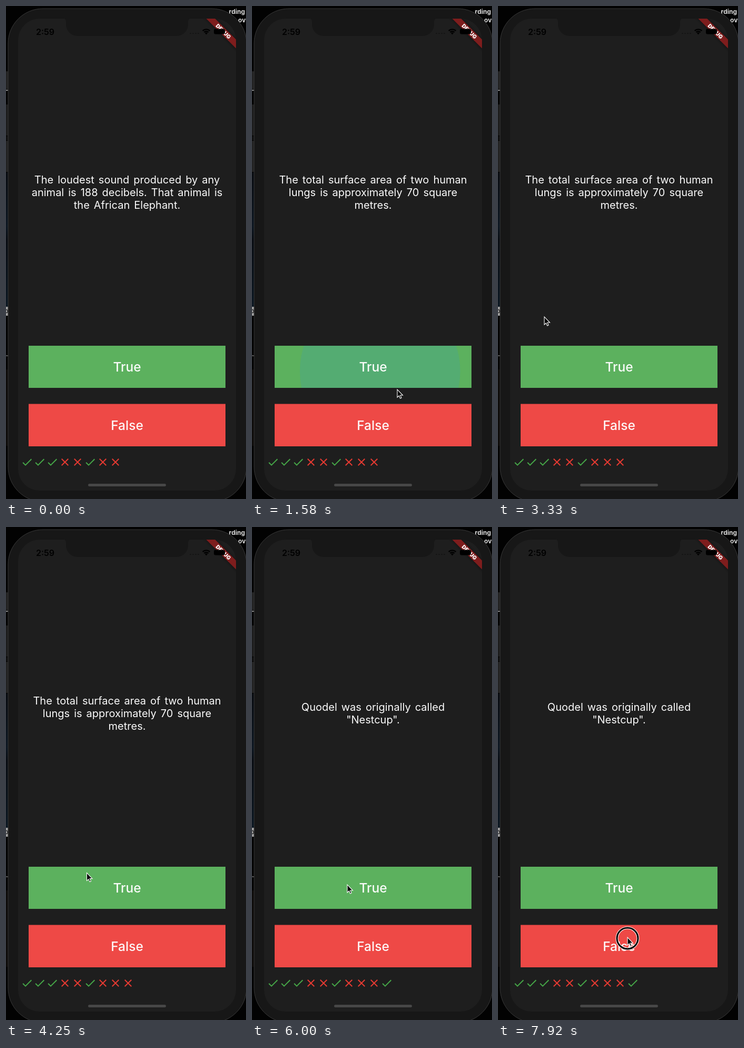
Recreate the animation shown at these times as an HTML page with a canvas. Size 456x936 px, loop 8 s.

```html
<!DOCTYPE html>
<html lang="en">
<head>
<meta charset="utf-8">
<title>Quiz</title>
<style>
  html, body { margin: 0; width: 100%; height: 100%; overflow: hidden; background: #000; }
  canvas { display: block; width: 456px; height: 936px; }
</style>
</head>
<body>
<canvas id="stage" width="456" height="936"></canvas>
<script>
const ctx = document.getElementById('stage').getContext('2d');
const LOOP = 8000, STEP = 1000 / 12;
const BEZEL = '#171717', SCREEN = '#1e1e1e';

const QUESTIONS = [
  { at: 0, lines: ['The loudest sound produced by any', 'animal is 188 decibels. That animal is', 'the African Elephant.'] },
  { at: 1490, lines: ['The total surface area of two human', 'lungs is approximately 70 square', 'metres.'] },
  { at: 4740, lines: ['Quodel was originally called', '"Nestcup".'] }
];
const ANSWERS = 'vvvxxvxxxv';
const TAPS = [
  { at: 1431, x: 268, y: 708, reach: 234 },
  { at: 4713, x: 178, y: 688, reach: 240 }
];
const PRESSES = [[1320, 1490], [4575, 4740], [7900, 8000]];
// Pointer stops: time, x, y
const PATH = [
  [500, 436, 884], [1080, 277, 708], [1420, 277, 708], [1580, 276, 728],
  [2880, 276, 728], [3330, 88, 590], [3800, 89, 590], [4500, 180, 684],
  [5200, 180, 684], [5700, 181, 679], [6500, 181, 679], [7080, 212, 730],
  [7830, 246, 779], [8000, 246, 779]
];

function box(x, y, w, h, fill, r = 0) {
  ctx.beginPath();
  ctx.roundRect(x, y, w, h, r);
  ctx.fillStyle = fill;
  ctx.fill();
}

function text(str, x, y, size, weight, fill, align = 'center', gap = 0) {
  ctx.font = `${weight} ${size}px Inter, sans-serif`;
  ctx.textAlign = align;
  ctx.wordSpacing = gap + 'px';
  ctx.fillStyle = fill;
  ctx.fillText(str, x, y);
}

function line(points, color, width) {
  ctx.beginPath();
  points.forEach(([x, y]) => ctx.lineTo(x, y));
  ctx.strokeStyle = color;
  ctx.lineWidth = width;
  ctx.stroke();
}

function desktop() {
  box(0, 0, 456, 936, '#020202');
  const blue = ctx.createLinearGradient(0, 316, 0, 572);
  blue.addColorStop(0, '#080b10');
  blue.addColorStop(0.4, '#0d1722');
  blue.addColorStop(0.5, '#080c12');
  blue.addColorStop(1, '#0b1722');
  box(0, 316, 5, 256, blue);
  box(0, 124, 5, 34, '#222');
  box(0, 159, 5, 2, '#888');
  box(0, 187, 5, 59, '#1c1c1c');
  box(0, 247, 5, 8, '#101010');
  box(0, 256, 5, 59, '#222');
  box(0, 571, 5, 17, '#a0a0a0');
  text('p', -3, 583, 12, 500, '#111', 'left');
  box(0, 663, 5, 2, '#555');
  box(0, 690, 5, 145, '#0d0b09');
  text('rding', 454, 15, 12, 700, '#ddd', 'right');
  text('ov', 441, 31, 12, 700, '#ddd', 'left');
}

function phone() {
  box(4, 5, 453, 936, BEZEL, 66);
  ctx.strokeStyle = '#383838';
  ctx.lineWidth = 1;
  ctx.stroke();
  box(23, 24, 414, 896, SCREEN, 41);
}

function banner() {
  ctx.save();
  ctx.beginPath();
  ctx.roundRect(23, 24, 414, 896, 41);
  ctx.clip();
  ctx.translate(437, 24);
  ctx.rotate(Math.PI / 4);
  ctx.shadowColor = 'rgba(0,0,0,.5)';
  ctx.shadowBlur = 6;
  box(-44, 28, 88, 12, '#7e1d1d');
  ctx.shadowBlur = 0;
  text('DEBUG', 0, 37.7, 10.2, 900, '#fff');
  ctx.restore();
}

function statusBar() {
  ctx.beginPath();
  ctx.moveTo(108, 23);
  ctx.quadraticCurveTo(114, 24, 114, 30);
  ctx.lineTo(114, 34);
  ctx.arcTo(114, 57, 137, 57, 22);
  ctx.arcTo(346, 57, 346, 34, 22);
  ctx.lineTo(346, 30);
  ctx.quadraticCurveTo(346, 24, 352, 23);
  ctx.fillStyle = BEZEL;
  ctx.fill();

  text('2:59', 57, 54.5, 16, 600, '#000', 'left');
  for (let i = 0; i < 4; i++) box(349 + i * 5, 51, 3, 2, '#151515', 1);

  ctx.strokeStyle = '#000';
  ctx.lineWidth = 2.4;
  for (const r of [5.8, 9.6]) {
    ctx.beginPath();
    ctx.arc(380.5, 54, r, -2.35, -0.79);
    ctx.stroke();
  }
  ctx.beginPath();
  ctx.moveTo(380.5, 54.3);
  ctx.arc(380.5, 54, 3.6, -2.35, -0.79);
  ctx.fillStyle = '#000';
  ctx.fill();
  box(395, 43.5, 21, 10, '#000', 3);
}

function ripple(t) {
  for (const tap of TAPS) {
    const age = t - tap.at;
    if (age < 0 || age > 350) continue;
    const p = Math.min(1, age / tap.reach);
    const alpha = 0.13 * Math.min(1, (350 - age) / 180);
    ctx.save();
    ctx.beginPath();
    ctx.rect(43, 645, 374, 80);
    ctx.clip();
    ctx.beginPath();
    ctx.arc(tap.x + (230 - tap.x) * p, tap.y + (685 - tap.y) * p, tap.reach * p, 0, 7);
    ctx.fillStyle = `rgba(33,140,243,${alpha})`;
    ctx.fill();
    ctx.restore();
  }
}

function mark(kind, x, y) {
  const at = pts => pts.map(([a, b]) => [x + a, y + b]);
  if (kind === 'v') {
    line(at([[4.1, 12.7], [9, 17.6], [20.3, 6.3]]), '#46a848', 2);
  } else {
    line(at([[5.7, 5.7], [18.3, 18.3]]), '#e53a32', 2);
    line(at([[18.3, 5.7], [5.7, 18.3]]), '#e53a32', 2);
  }
}

function quiz(t) {
  const n = QUESTIONS.filter(q => t >= q.at).length - 1;
  const { lines } = QUESTIONS[n];
  const top = 373 - lines.length * 12;
  lines.forEach((s, i) => text(s, 230, top + i * 24, 20, 400, '#fafafa', 'center', 2.4));

  box(43, 645, 374, 80, '#5cb15e');
  ripple(t);
  box(43, 755.5, 374, 80.5, '#ee4946');
  text('True', 230, 694, 24.5, 500, '#f8fbf8');
  text('False', 230, 804.5, 24.5, 500, '#fdf6f6');

  [...ANSWERS.slice(0, 8 + n)].forEach((k, i) => mark(k, 28 + i * 24, 854));
  box(156, 907, 148, 5, '#474747', 2.5);
}

function pointerAt(t) {
  const i = PATH.findIndex(p => p[0] > t);
  const [t0, x0, y0] = PATH[i - 1], [t1, x1, y1] = PATH[i];
  const p = (t - t0) / (t1 - t0), e = p * p * (3 - 2 * p);
  return [x0 + (x1 - x0) * e, y0 + (y1 - y0) * e];
}

function pointer(t) {
  if (t < PATH[0][0]) return;
  const [x, y] = pointerAt(t);
  if (PRESSES.some(([a, b]) => t >= a && t < b)) {
    for (const [color, width] of [['#fff', 5], ['#000', 3]]) {
      ctx.beginPath();
      ctx.arc(x, y + 2, 20, 0, 7);
      ctx.strokeStyle = color;
      ctx.lineWidth = width;
      ctx.stroke();
    }
  }
  ctx.save();
  ctx.translate(x, y);
  ctx.beginPath();
  for (const [a, b] of [[0, 0], [0, 15], [3.4, 12], [5.6, 17], [8, 16], [5.8, 11], [10.5, 11]]) ctx.lineTo(a, b);
  ctx.closePath();
  ctx.fillStyle = '#000';
  ctx.fill();
  ctx.strokeStyle = '#fff';
  ctx.lineWidth = 1.1;
  ctx.stroke();
  ctx.restore();
}

function draw(ms) {
  const t = Math.min(95, Math.floor((ms % LOOP) / STEP + 0.08)) * STEP;
  desktop();
  phone();
  banner();
  statusBar();
  quiz(t);
  pointer(t);
}

const start = performance.now();
function tick() {
  draw(performance.now() - start);
  requestAnimationFrame(tick);
}
tick();
</script>
</body>
</html>
```
